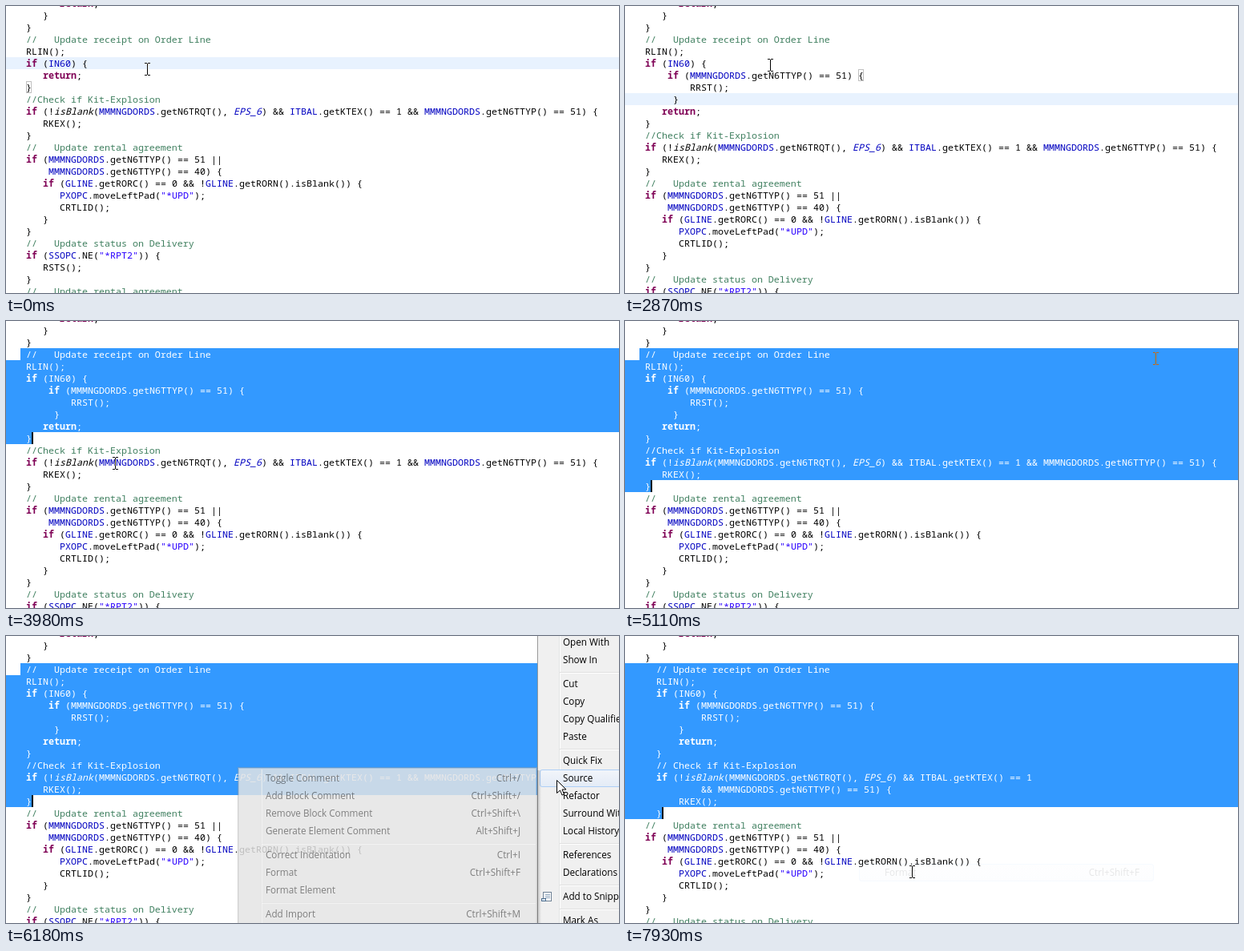
Write an HTML page with a canvas that moves like this. It is 765 by 359 pixels and loops after 7.99 s.

```html
<!DOCTYPE html>
<html lang="en">
<head>
<meta charset="utf-8">
<title>Code formatting</title>
<style>
html, body { margin: 0; width: 100%; height: 100%; overflow: hidden; background: #fff; }
canvas { display: block; width: 765px; height: 359px; }
</style>
</head>
<body>
<canvas id="stage" width="765" height="359"></canvas>
<script>
const ctx = document.getElementById('stage').getContext('2d', { alpha: false });
const W = 765, H = 359, LOOP = 7990;
const ROW = 15, COL = 7, TOP = -11, LEFT = 4;
const MONO = '11.667px "Noto Sans Mono", "DejaVu Sans Mono", monospace';
const UI = '11.7px "Open Sans", "Noto Sans", sans-serif';
const BLUE = '#3399ff';

const HEAD = `         return;
      }
   }`;
const BEFORE = `   //   Update receipt on Order Line
   RLIN();
   if (IN60) {`;
const AFTER = `      return;
   }
   //Check if Kit-Explosion
   if (!isBlank(MMMNGDORDS.getN6TRQT(), EPS_6) && ITBAL.getKTEX() == 1 && MMMNGDORDS.getN6TTYP() == 51) {
      RKEX();
   }`;
const PASTED = `       if (MMMNGDORDS.getN6TTYP() == 51) {
           RRST();
        }`;
const TIDY = `     // Update receipt on Order Line
     RLIN();
     if (IN60) {
         if (MMMNGDORDS.getN6TTYP() == 51) {
             RRST();
         }
         return;
     }
     // Check if Kit-Explosion
     if (!isBlank(MMMNGDORDS.getN6TRQT(), EPS_6) && ITBAL.getKTEX() == 1
             && MMMNGDORDS.getN6TTYP() == 51) {
         RKEX();
     }`;
const TAIL = `   //   Update rental agreement
   if (MMMNGDORDS.getN6TTYP() == 51 ||
       MMMNGDORDS.getN6TTYP() == 40) {
      if (GLINE.getRORC() == 0 && !GLINE.getRORN().isBlank()) {
         PXOPC.moveLeftPad("*UPD");
         CRTLID();
      }
   }
   //   Update status on Delivery
   if (SSOPC.NE("*RPT2")) {
      RSTS();
   }
   //   Update rental agreement`;

const doc = (...parts) => [HEAD, ...parts, TAIL].join('\n').split('\n');
const DOCS = {
  start: doc(BEFORE, AFTER),
  blank: doc(BEFORE, '', AFTER),
  pasted: doc(BEFORE, PASTED, AFTER),
  tidy: doc(TIDY)
};

const STYLES = {
  comment: ['', '#3f7f5f'],
  string: ['', '#2a00ff'],
  keyword: ['bold ', '#7f0055'],
  field: ['', '#0000c0'],
  constant: ['italic ', '#0000c0'],
  call: ['italic ', '#000'],
  plain: ['', '#000']
};
const TOKEN = /(?<comment>\/\/.*)|(?<string>"[^"]*")|(?<keyword>\b(?:if|return)\b)|(?<field>\b(?:IN60|MMMNGDORDS|ITBAL|GLINE|PXOPC|SSOPC)\b)|(?<constant>EPS_6)|(?<call>isBlank(?=\(MMM))|(?<plain>[^\s"]+?(?=\s|"|\b|$))/g;

const MAIN = {
  x: 663, y: -40, w: 200, first: 8, items: ['Open With', 'Show In', '-', 'Cut', 'Copy', 'Copy Qualified Name',
    'Paste', '-', 'Quick Fix', 'Source', 'Refactor', 'Surround With', 'Local History', '-',
    'References', 'Declarations', '-', 'Add to Snippets...', '-', 'Mark As']
};
const SUB = {
  x: 289, y: 164, w: 374, first: 178, items: ['Toggle Comment|Ctrl+/', 'Add Block Comment|Ctrl+Shift+/',
    'Remove Block Comment|Ctrl+Shift+\\', 'Generate Element Comment|Alt+Shift+J', '-',
    'Correct Indentation|Ctrl+I', 'Format|Ctrl+Shift+F', 'Format Element', '-',
    'Add Import|Ctrl+Shift+M']
};

// Pointer path: time, x, y
const PATH = [
  [0, 176, 79], [60, 176, 79], [360, 163, 70], [2480, 163, 70], [2680, 264, 88],
  [3210, 33, 48], [3330, 33, 48], [3400, 18, 43], [3480, 18, 43], [3690, 47, 69],
  [3750, 64, 78], [4040, 155, 203], [4100, 165, 205], [4280, 168, 206], [4530, 168, 206],
  [5110, 662, 47], [5290, 662, 47], [5450, 668, 60], [6000, 687, 180], [6180, 687, 180],
  [6360, 640, 162], [6600, 500, 215], [6930, 360, 314], [7050, 357, 294], [LOOP, 357, 294]
];
const CARET_ON = [[310, 850], [1410, 2480], [3010, 4530], [5060, LOOP]];

const clamp = (v, lo = 0, hi = 1) => Math.min(hi, Math.max(lo, v));
const rowY = row => TOP + row * ROW;
const colX = col => LEFT + col * COL;

function rect(x, y, w, h, color) {
  ctx.fillStyle = color;
  ctx.fillRect(x, y, w, h);
}

function pointer(t) {
  const i = Math.max(1, PATH.findIndex(p => p[0] > t));
  const [t0, x0, y0] = PATH[i - 1], [t1, x1, y1] = PATH[i];
  const k = clamp((t - t0) / (t1 - t0));
  return { x: Math.round(x0 + (x1 - x0) * k), y: Math.round(y0 + (y1 - y0) * k) };
}

function drawCode(lines, white) {
  lines.forEach((line, row) => {
    for (const m of line.matchAll(TOKEN)) {
      const kind = Object.keys(m.groups).find(k => m.groups[k] !== undefined);
      const [face, color] = STYLES[kind];
      ctx.font = face + MONO;
      ctx.fillStyle = white ? '#fff' : color;
      ctx.fillText(m[0], colX(m.index), rowY(row) + 12);
    }
  });
}

function drawSelection(lines, from, to) {
  ctx.save();
  ctx.beginPath();
  for (let row = from.row; row <= to.row; row++) {
    const x0 = row === from.row ? (from.col ? colX(from.col) : 0) : 0;
    const x1 = row === to.row ? colX(to.col) : W;
    if (x1 > x0) ctx.rect(x0, rowY(row), x1 - x0, ROW);
  }
  ctx.clip();
  rect(0, 0, W, H, BLUE);
  drawCode(lines, true);
  ctx.restore();
}

function bracketBox(row, col) {
  ctx.strokeStyle = '#c0c0c0';
  ctx.lineWidth = 1;
  ctx.strokeRect(colX(col) + .5, rowY(row) + .5, 6, 14);
}

// Editor contents and caret at a given time
function editor(t) {
  if (t < 1650) return { lines: DOCS.start, caret: { row: 5, col: 14 }, match: [7, 3] };
  if (t < 1960) return { lines: DOCS.blank, caret: { row: 6, col: 7 } };
  if (t < 3400) return { lines: DOCS.pasted, caret: { row: 8, col: 9 }, match: [6, 41] };
  if (t < 7800) {
    const lines = DOCS.pasted, p = pointer(Math.min(t, 4280) - 60);
    const row = t < 3480 ? 3 : clamp(Math.floor((p.y - TOP) / ROW), 3, 14);
    const col = t < 3480 ? 2 : clamp(Math.round((p.x - LEFT) / COL), 0, lines[row].length);
    return { lines, caret: { row, col }, from: { row: 3, col: 2 } };
  }
  return { lines: DOCS.tidy, caret: { row: 15, col: 6 }, from: { row: 3, col: 0 } };
}

function drawEditor(t) {
  const { lines, caret, match, from } = editor(t);
  const selected = from && (caret.row !== from.row || caret.col !== from.col);
  if (!selected) rect(0, rowY(caret.row), W, ROW, '#e8f2fe');
  drawCode(lines, false);
  if (match) bracketBox(...match);
  if (selected) drawSelection(lines, from, caret);
  if (CARET_ON.some(([a, b]) => t >= a && t < b)) {
    ctx.globalCompositeOperation = 'difference';
    rect(colX(caret.col), rowY(caret.row), 2, ROW, '#fff');
    ctx.globalCompositeOperation = 'source-over';
  }
}

function drawHighlight(x, y, w) {
  const g = ctx.createLinearGradient(0, y - 11, 0, y + 11);
  g.addColorStop(0, '#f2f5fa');
  g.addColorStop(1, '#e3ebf6');
  ctx.fillStyle = g;
  ctx.strokeStyle = '#aecff7';
  ctx.lineWidth = 1;
  ctx.beginPath();
  ctx.roundRect(x + .5, y - 10.5, w - 1, 21, 2.5);
  ctx.fill();
  ctx.stroke();
}

function drawLabel(menu, item, y) {
  const [name, keys] = item.split('|');
  ctx.font = UI;
  ctx.fillStyle = '#000';
  ctx.fillText(name, menu.x + (menu === SUB ? 35 : 32), y + 4);
  if (!keys) return;
  ctx.textAlign = 'right';
  ctx.fillText(keys, 642, y + 4);
  ctx.textAlign = 'left';
}

function eachItem(menu, fn) {
  let y = menu.first;
  for (const item of menu.items) {
    fn(item, item === '-' ? y - 7 : y);
    y += item === '-' ? 8 : 22;
  }
}

function hovered(menu, p) {
  let hit = null;
  if (p.x < menu.x + 3 || p.x > menu.x + menu.w - 3) return hit;
  eachItem(menu, (item, y) => { if (item !== '-' && Math.abs(p.y - y) <= 11) hit = item; });
  return hit;
}

function drawMenu(menu, active, alpha) {
  const { x, y, w } = menu;
  const gutter = x + (menu === SUB ? 29 : 27);
  ctx.save();
  ctx.globalAlpha = alpha;
  if (menu === SUB) {
    const g = ctx.createLinearGradient(x + w, 0, x + w + 5, 0);
    g.addColorStop(0, 'rgba(0,0,0,.45)');
    g.addColorStop(1, 'rgba(0,0,0,0)');
    rect(x + w, y + 4, 5, H, g);
  }
  rect(x, y, w, 500, '#979797');
  rect(x + 1, y + 1, w - 2, 500, '#f5f5f5');
  rect(x + 2, y + 2, w - 4, 500, '#f0f0f0');
  rect(gutter, y + 3, 1, 500, '#e2e3e3');
  rect(gutter + 1, y + 3, 1, 500, '#fff');
  eachItem(menu, (item, cy) => {
    if (item === '-') {
      rect(gutter + 1, cy, w - 32, 1, '#e0e0e0');
      rect(gutter + 1, cy + 1, w - 32, 1, '#fff');
      return;
    }
    if (item === active) drawHighlight(x + 3, cy, w - 6);
    drawLabel(menu, item, cy);
    if (item.startsWith('Add to')) drawIcon(668, cy - 6);
  });
  ctx.restore();
}

function drawIcon(x, y) {
  rect(x + 2, y, 11, 12, '#6f8296');
  rect(x + 3, y + 1, 9, 10, '#fff');
  for (let i = 0; i < 3; i++) rect(x + 5, y + 3 + i * 2, 6, 1, '#8fa6bd');
  rect(x, y + 8, 6, 4, '#4f6f90');
  rect(x + 1, y + 9, 4, 2, '#dce8f4');
}

function drawBeam({ x, y }) {
  ctx.globalCompositeOperation = 'difference';
  rect(x, y - 7, 1, 14, '#fff');
  for (const sy of [y - 8, y + 7]) {
    rect(x - 3, sy, 3, 1, '#fff');
    rect(x + 1, sy, 3, 1, '#fff');
  }
  ctx.globalCompositeOperation = 'source-over';
}

function drawArrow({ x, y }) {
  const pts = [[0, 0], [0, 16], [4, 12.5], [6.5, 18.5], [9, 17.5], [6.5, 11.5], [11.5, 11.5]];
  ctx.beginPath();
  for (const [dx, dy] of pts) ctx.lineTo(x + .5 + dx, y + .5 + dy);
  ctx.closePath();
  ctx.fillStyle = '#fff';
  ctx.strokeStyle = '#000';
  ctx.lineWidth = 1;
  ctx.fill();
  ctx.stroke();
}

function draw(t) {
  const p = pointer(t);
  rect(0, 0, W, H, '#fff');
  drawEditor(t);
  if (t >= 5290 && t < 7730) {
    const open = t >= 6180;
    drawMenu(MAIN, open ? 'Source' : hovered(MAIN, p), clamp(.4 + (t - 5290) / 250));
    if (open) drawMenu(SUB, hovered(SUB, p), clamp(.45 + (t - 6180) / 250));
  } else if (t >= 7730) {
    // The chosen item lingers briefly
    ctx.globalAlpha = clamp(1 - (t - 7730) / 222);
    drawHighlight(SUB.x + 3, 296, SUB.w - 6);
    drawLabel(SUB, SUB.items[6], 296);
    ctx.globalAlpha = 1;
  }
  if (t >= 5290 && t < 7790) drawArrow(p);
  else drawBeam(t < 7790 ? p : { x: p.x + 1, y: p.y + 1 });
}

const begin = performance.now();
function tick() {
  draw((performance.now() - begin) % LOOP);
  requestAnimationFrame(tick);
}
tick();
</script>
</body>
</html>
```
